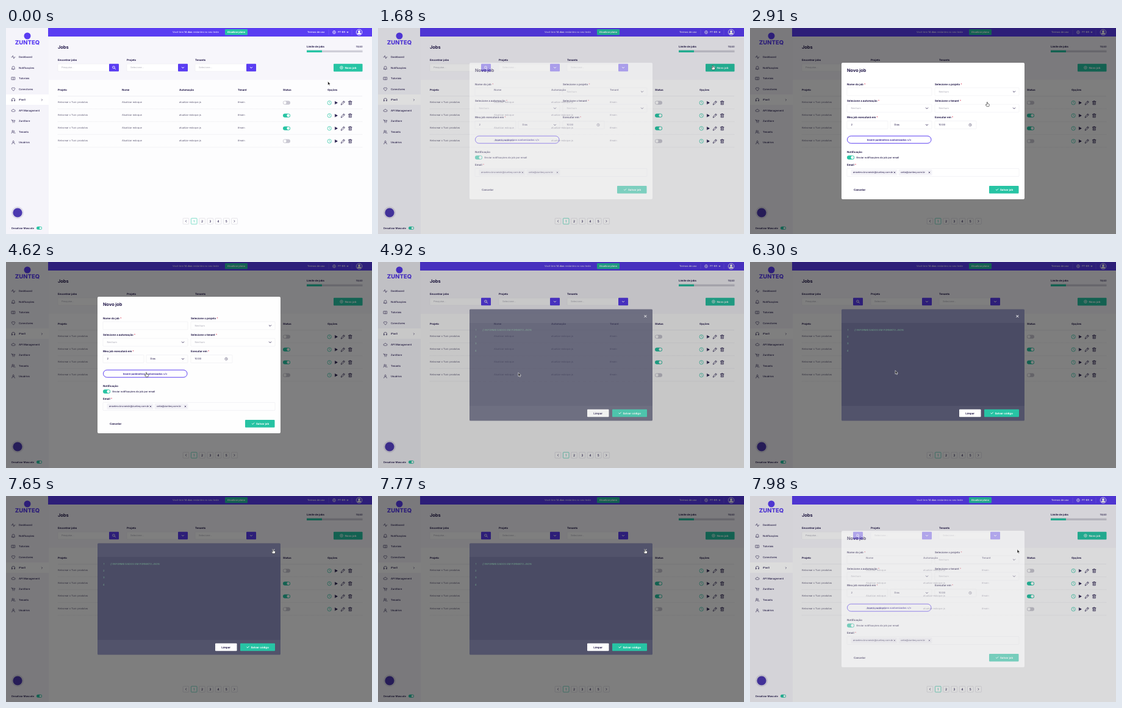
An HTML page that plays this animation: 600 by 338 pixels, repeating every 8000 ms.

```html
<!DOCTYPE html>
<html lang="pt-BR">
<head>
<meta charset="utf-8">
<title>Jobs</title>
<style>
  html, body { margin: 0; width: 100%; height: 100%; overflow: hidden; background: #fff; }
  svg { display: block; width: 100vw; height: 100vh; }
  text { font-family: Inter, "Open Sans", sans-serif; text-rendering: geometricPrecision; white-space: pre; }
</style>
</head>
<body>
<svg id="stage" viewBox="0 0 600 338" preserveAspectRatio="none"></svg>
<script>
const PURPLE = '#5a3df2', TEAL = '#27c4a4', INK = '#1f1547', GREY = '#a9a8b4', LINE = '#e4e3ea';

// ---- Drawing helpers (text is placed by its vertical centre) ----
const text = (x, y, str, { size = 4.1, weight = 500, fill = INK, anchor = 'start' } = {}) =>
  `<text x="${x}" y="${y + size * .36}" font-size="${size}" font-weight="${weight}" fill="${fill}" text-anchor="${anchor}">${str}</text>`;
const bold = (x, y, str, options) => text(x, y, str, { size: 4.4, weight: 700, ...options });
const box = (x, y, w, h, fill, { r = 0, stroke = 'none', sw = .6 } = {}) =>
  `<rect x="${x}" y="${y}" width="${w}" height="${h}" rx="${r}" fill="${fill}" stroke="${stroke}" stroke-width="${sw}"/>`;
const dot = (x, y, r, fill, stroke = 'none', sw = .7) =>
  `<circle cx="${x}" cy="${y}" r="${r}" fill="${fill}" stroke="${stroke}" stroke-width="${sw}"/>`;
const path = (x, y, d, stroke = INK, sw = .6, fill = 'none') =>
  `<path transform="translate(${x} ${y})" d="${d}" fill="${fill}" stroke="${stroke}" stroke-width="${sw}" stroke-linecap="round" stroke-linejoin="round"/>`;
const chevron = (x, y, stroke = INK, sw = .8) => path(x, y, 'M-1.7-.8L0 .9 1.7-.8', stroke, sw);
const check = (x, y) => path(x, y, 'M-1.7 0L-.5 1.2 1.8-1.2', '#fff', .9);
const clock = (x, y, r, stroke) =>
  dot(x, y, r, 'none', stroke) + path(x, y, `M0 ${-r * .55}V0L${r * .4} ${r * .3}`, stroke, .6);
const toggle = (x, y, on, w = 12, h = 6.4) =>
  box(x, y - h / 2, w, h, on ? TEAL : '#c9c8d2', { r: h / 2 }) +
  dot(on ? x + w - h / 2 : x + h / 2, y, h / 2 - .8, '#fff');

// ---- Page behind the dialogs ----
const MENU = [
  ['Dashboard', 'M-3 0h1.2l1-2.4L.8 2.4 1.8 0H3'],
  ['Notificações', 'M-2 1.5V-.5a2 2 0 0 1 4 0v2l.6.5h-5.2zM-.6 2.8h1.2'],
  ['Tutoriais', 'M-2.7-2H-.4L0-1.6.4-2H2.7V2H-2.7zM0-1.6V2'],
  ['Conectores', 'M0 2.6L-2.5 0A1.5 1.5 0 0 1 0-1.7 1.5 1.5 0 0 1 2.5 0z'],
  ['iPaaS', 'M-2.6 2V0a2.6 2.6 0 0 1 5.2 0v2H1.4V.4h1.2M-2.6.4h1.2V2h-1.2'],
  ['API Management', 'M-1.7 1.8a1.3 1.3 0 0 1 0-2.6 1.9 1.9 0 0 1 3.5 0 1.3 1.3 0 0 1 0 2.6z'],
  ['ZunStore', 'M-3-2h1l.8 3H2L2.7-1.2H-1.7M-1 2.4h.2M1.6 2.4h.2'],
  ['Tenants', 'M-1.2-2.2a1.2 1.2 0 1 0 .1 0M-3 2.4a2 2 0 0 1 4 0M1-2a1.2 1.2 0 0 1 0 2.2M1.8.8a2 2 0 0 1 1.2 1.6'],
  ['Usuários', 'M0-2.6a1.3 1.3 0 1 0 .1 0M-2.4 2.6a2.4 2.4 0 0 1 4.8 0']
];

function sidebar() {
  const items = MENU.map(([label, icon], i) => {
    const y = 47.8 + i * 17.5;
    return path(12, y, icon, INK, .55) + text(21, y, label, { size: 4.2 });
  }).join('');
  return box(0, 0, 70, 338, '#f5f4fa') + box(0, 109, 70, 17, '#fff') +
    dot(35, 13, 5.5, PURPLE) +
    text(35, 24, 'ZUNTEQ', { size: 9.5, weight: 800, fill: PURPLE, anchor: 'middle' }) +
    items + path(59, 118, 'M-.6-1.2L.6 0-.6 1.2', INK, .6) +
    dot(19, 303, 10, '#dddbe8') + dot(19, 303, 7.6, '#4c39b0') +
    bold(9, 328.3, 'Desativar Mascote', { size: 4.1, weight: 600 }) + toggle(50, 328.3, true, 9, 5);
}

function topBar() {
  const white = { fill: '#fff', size: 4 };
  return box(69, 0, 531, 14, PURPLE) +
    text(273, 7, 'Você tem <tspan font-weight="700">14 dias</tspan> restantes no seu teste', { ...white, fill: '#e4deff' }) +
    box(359, 2, 37, 9.5, TEAL, { r: 1 }) + bold(377.5, 6.8, 'Atualizar plano', { ...white, anchor: 'middle' }) +
    text(494, 7, 'Termos de uso', white) + path(529, 7, 'M0-4V4', '#8d78f7', .4) +
    dot(538, 7, 2.6, 'none', '#fff', .5) + path(538, 7, 'M-2.6 0H2.6M0-2.6Q-2 0 0 2.6 2 0 0-2.6', '#fff', .4) +
    text(544, 7, 'PT-BR', white) + path(560, 7, 'M-1.3-.7H1.3L0 .9z', '#fff', .2, '#fff') +
    path(567, 7, 'M0-4V4', '#8d78f7', .4) +
    dot(579, 7, 4.8, PURPLE, '#fff', .8) + dot(579, 5.8, 2, '#fff') +
    path(579, 7, 'M-3.2 3.2a3.2 2.8 0 0 1 6.4 0z', '#fff', .2, '#fff');
}

function filter(x, label, hint, icon) {
  return bold(x, 52.3, label) + box(x, 59, 100, 12, '#fff', { r: 1, stroke: LINE, sw: .4 }) +
    text(x + 6, 65, hint, { size: 4, fill: GREY, weight: 400 }) +
    box(x + 84, 58.8, 16, 12.4, PURPLE, { r: 1 }) + icon;
}

function tableRow(y, on) {
  const cell = { size: 4, weight: 400, fill: '#5d5874' };
  return text(85, y, 'Kelvomar x Tuvi: produtos', cell) + text(190, y, 'Atualizar estoque', cell) +
    text(284, y, 'atualiza-estoque.js', cell) + text(380, y, '#main', cell) +
    toggle(454, y + .6, on) + clock(530.2, y + .7, 3.2, TEAL) +
    path(541.4, y + .7, 'M-2-2.4L2.2 0-2 2.4z', INK, .3, INK) +
    path(552.4, y + .7, 'M-3 3l.5-2L1.6-3 3-1.6-1 2.5zM.6-2L2-.6', INK, .7) +
    path(564.2, y + .7, 'M-2.8-2H2.8M-1-2v-1H1v1M-2.1-2v5h4.2v-5M-.7-.6v2.2M.7-.6v2.2', INK, .7) +
    `<path d="M85 ${y + 10.7}H584" stroke="#d3d2da" stroke-width=".5" stroke-dasharray="1 1"/>`;
}

function pagination() {
  return ['‹', 1, 2, 3, 4, 5, '›'].map((label, i) => {
    const x = 295 + i * 13.25, active = label === 1, color = active ? TEAL : INK;
    const arrow = i === 0 ? 'M.7-1.5L-.7 0 .7 1.5' : 'M-.7-1.5L.7 0-.7 1.5';
    return box(x - 4.8, 312.2, 9.6, 9.6, '#fff', { r: 1, stroke: active ? TEAL : '#d2d1da' }) +
      (typeof label === 'string' ? path(x, 317, arrow, INK, .6)
                                 : text(x, 317, label, { size: 5, fill: color, anchor: 'middle' }));
  }).join('');
}

function page() {
  const columns = [[85, 'Projeto'], [190, 'Nome'], [284, 'Automação'], [380, 'Tenant'], [454, 'Status'], [527, 'Opções']];
  return box(0, 0, 600, 338, '#fdfdfe') + box(70, 14, 530, 71, '#f7f6fb') + sidebar() + topBar() +
    bold(85, 31.5, 'Jobs', { size: 7.4 }) +
    filter(85, 'Encontrar jobs', 'Pesquise...',
      dot(176.5, 64.5, 1.8, 'none', '#fff', .9) + path(178, 66, 'M0 0L1.4 1.4', '#fff', 1)) +
    filter(198, 'Projeto', 'Selecione...', chevron(290, 65, '#fff', 1)) +
    filter(310, 'Tenants', 'Selecione...', chevron(402, 65, '#fff', 1)) +
    bold(493, 30.3, 'Limite de jobs', { size: 4.3 }) + text(584.5, 30.3, '15/40', { size: 4, anchor: 'end' }) +
    box(493, 36.6, 91.5, 3.4, '#cfced8') + box(493, 36.6, 25, 3.4, TEAL) +
    box(537, 58.8, 47.5, 12.6, TEAL, { r: 1 }) +
    dot(550, 65, 2.4, 'none', '#fff') + path(550, 65, 'M-1.1 0H1.1M0-1.1V1.1', '#fff', .6) +
    bold(555.5, 65, 'Novo job', { fill: '#fff' }) +
    columns.map(([x, label]) => bold(x, 101.4, label, { size: 4.3 })).join('') +
    `<path d="M85 111.8H584" stroke="#dddce4" stroke-width=".5"/>` +
    [false, true, true, false].map((on, i) => tableRow(122 + i * 21, on)).join('') + pagination();
}

// ---- Job form ----
function field(x, y, w, label, value, { select = false, hint = false } = {}) {
  return (label ? bold(x, y - 12.5, label) : '') +
    box(x, y - 6.5, w, 13, '#fff', { r: 1, stroke: LINE, sw: .4 }) +
    text(x + 6.5, y, value, { size: 4.1, weight: 400, fill: hint ? GREY : INK }) +
    (select ? chevron(x + w - 8, y) : '');
}

function emailChip(x, w, address) {
  return box(x, 232.3, w, 9.4, '#f4f3f8', { r: 1 }) + text(x + 3.5, 237, address, { size: 4, weight: 400 }) +
    path(x + w - 4.5, 237, 'M-1-1L1 1M1-1L-1 1', INK, .6);
}

function jobForm() {
  const star = ' <tspan fill="#e0405a">*</tspan>', empty = { select: true, hint: true };
  return box(150, 57, 300, 224, '#fff', { r: 2 }) + bold(159, 69.7, 'Novo job', { size: 7.3 }) +
    field(159, 104.5, 139, 'Nome do job' + star, '') +
    field(303, 104.5, 138, 'Selecione o projeto' + star, 'Nenhum', empty) +
    field(159, 131.7, 139, 'Selecione a automação' + star, 'Nenhum', empty) +
    field(303, 131.7, 138, 'Selecione o tenant' + star, 'Nenhum', empty) +
    field(159, 159, 67, 'Meu job executará em' + star, '2') +
    field(230, 159, 68, '', 'Dias', { select: true }) +
    field(303, 159, 68, 'Executar em' + star, '10:00') + clock(361, 159, 2.1, '#6d6884') +
    box(159.5, 177.2, 137.5, 12, '#fff', { r: 6, stroke: PURPLE, sw: 1 }) +
    bold(228.2, 183.2, 'Inserir parâmetros customizados &lt;/&gt;', { size: 4, fill: '#3a269f', anchor: 'middle' }) +
    bold(159, 203, 'Notificação') + toggle(159, 212.5, true) +
    text(174.5, 212.5, 'Enviar notificações do job por email', { size: 4.1 }) +
    bold(159, 224.6, 'Email' + star) + box(159, 230.5, 282, 13, '#fff', { r: 1, stroke: LINE, sw: .4 }) +
    emailChip(165.5, 76, 'anselmo.brunwick@zunteq.com.br') + emailChip(243.5, 55, 'celia@zunteq.com.br') +
    bold(170, 265, 'Cancelar') +
    box(392, 259, 48.5, 12.5, TEAL, { r: 1 }) + check(405, 265.2) + bold(410, 265.2, 'Salvar job', { fill: '#fff' });
}

// ---- Code editor ----
function codeEditor() {
  const code = { size: 4.2, weight: 400, fill: '#71a58c' };
  return box(150, 77.5, 300, 183, '#52536b', { r: 1.5 }) + box(150, 100, 300, 136, '#4a4b64') +
    path(438.4, 89, 'M-1.6-1.6L1.6 1.6M1.6-1.6L-1.6 1.6', '#fff', 1) +
    [1, 2, 3, 4].map(n => text(161.5, 100 + n * 11.3, n, { ...code, anchor: 'end' })).join('') +
    text(171, 111.3, '// INFORME DADOS EM FORMATO JSON', code) +
    box(343, 241.7, 35.5, 12.6, '#fff', { r: 1 }) + bold(360.7, 248, 'Limpar', { anchor: 'middle' }) +
    box(384, 241.7, 57, 12.6, TEAL, { r: 1 }) + check(396.5, 248) + bold(401.5, 248, 'Salvar código', { fill: '#fff' });
}

const ARROW = 'M0 0V6.2L1.5 4.9 2.5 7 3.5 6.5 2.6 4.5H4.4z';
const HAND = 'M-.7.2Q0-.5.7.2V2.6L3 3.1Q3.7 3.4 3.5 4.2L2.8 7H-.9L-2.7 4.4Q-2.5 3.4-1.6 3.9L-.7 4.6z';

const stage = document.getElementById('stage');
stage.innerHTML = page() + `<rect id="backdrop" width="600" height="338"/>
  <g id="form">${jobForm()}</g><g id="editor">${codeEditor()}</g>
  <path id="cursor" stroke-width=".6" stroke-linejoin="round"/>`;
const [backdrop, form, editor, cursor] =
  ['backdrop', 'form', 'editor', 'cursor'].map(id => document.getElementById(id));

// ---- Timeline: [time in ms, value] pairs ----
const LOOP = 8000;
const BACKDROP = [[1650, 0], [1680, .13], [1980, .5], [4620, .5], [4770, .12], [4830, .12],
                  [5130, .43], [5300, .5], [7830, .5], [7950, .1], [8000, .16]];
const FORM = [[1650, 0], [1680, .52], [1860, 1], [4620, 1], [4800, 0], [7940, 0], [7980, .55], [8000, .68]];
const EDITOR = [[4740, 0], [4980, 1], [7830, 1], [7950, 0]];
const MOVES = [[30, 690, 549, 61.5], [2520, 3300, 230, 181.5], [6200, 7050, 438, 87.5]];
const HAND_TIMES = [[600, 1950], [2780, 3040], [3170, 4750], [6990, 7890]];

function valueAt(track, t) {
  const next = track.findIndex(([time]) => time > t);
  if (next < 0) return track[track.length - 1][1];
  if (next === 0) return track[0][1];
  const [t0, v0] = track[next - 1], [t1, v1] = track[next];
  return v0 + (v1 - v0) * (t - t0) / (t1 - t0);
}

function cursorAt(t) {
  let x = 527.5, y = 87.5;
  for (const [start, end, toX, toY] of MOVES) {
    const p = Math.min(1, Math.max(0, (t - start) / (end - start)));
    const eased = p * p * (3 - 2 * p);
    x += (toX - x) * eased;
    y += (toY - y) * eased;
  }
  return [x, y];
}

function render(now) {
  const t = now % LOOP;
  backdrop.setAttribute('opacity', valueAt(BACKDROP, t));
  form.setAttribute('opacity', valueAt(FORM, t));
  editor.setAttribute('opacity', valueAt(EDITOR, t));
  const hand = HAND_TIMES.some(([start, end]) => t >= start && t < end);
  cursor.setAttribute('d', hand ? HAND : ARROW);
  cursor.setAttribute('fill', hand ? '#fff' : '#222');
  cursor.setAttribute('stroke', hand ? '#222' : '#fff');
  cursor.setAttribute('transform', `translate(${cursorAt(t)})`);
  requestAnimationFrame(render);
}
render(performance.now());
</script>
</body>
</html>
```
